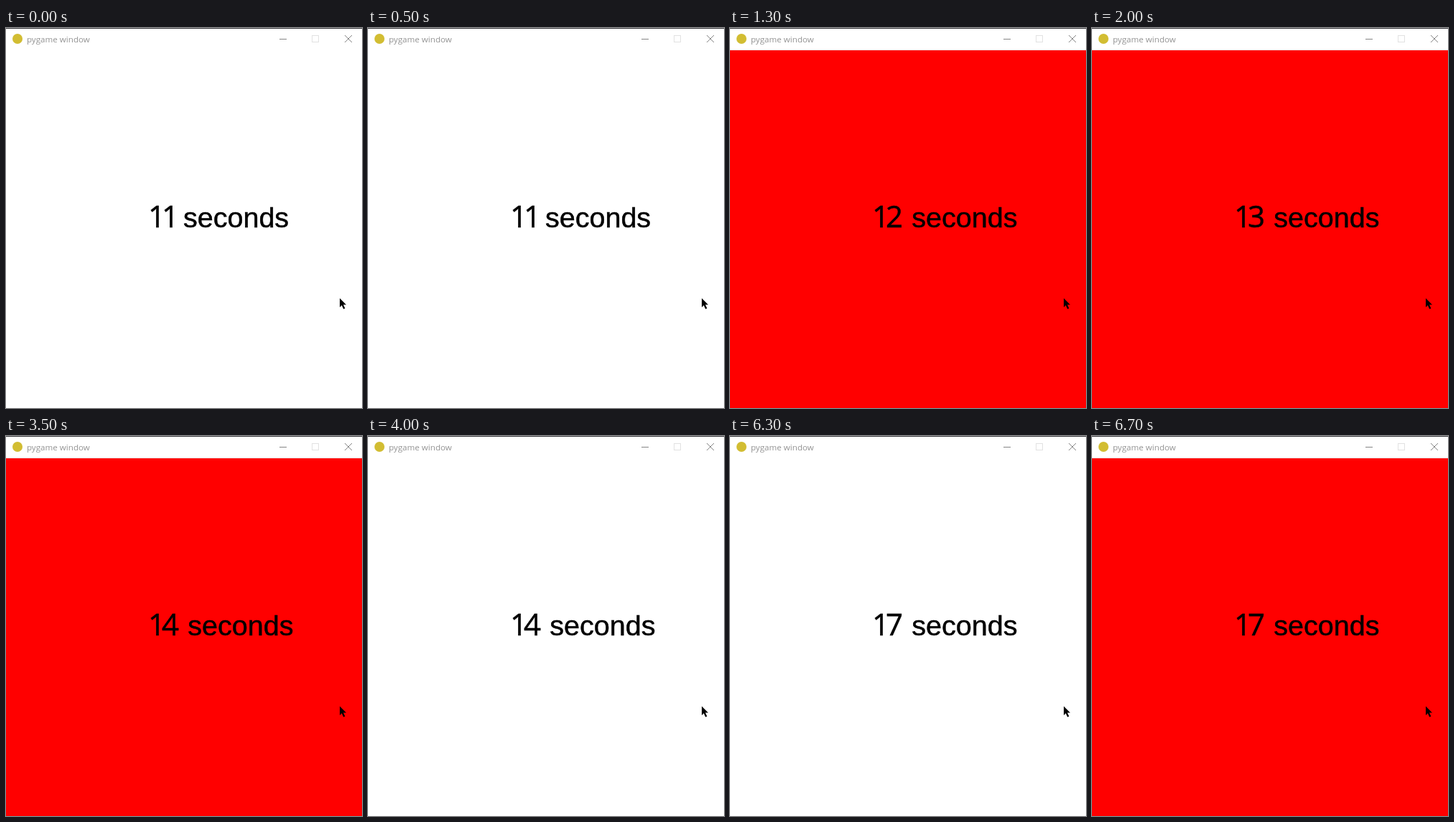
Animation, 496 px wide and 528 px high, one loop 7.2 s. Source, as an HTML page:

```html
<!DOCTYPE html>
<html lang="en">
<head>
<meta charset="utf-8">
<title>pygame window</title>
<style>
  html, body { margin: 0; width: 100%; height: 100%; overflow: hidden; background: #fff; }
  svg { display: block; width: 496px; height: 528px; }
  .title { font: 11.6px "Open Sans", "Noto Sans", sans-serif; fill: #939393; }
  .timer { font: 39.5px "Liberation Sans", Arial, sans-serif; stroke: #000; stroke-width: .5; }
  .digit { font: 42px "Open Sans", "Noto Sans", sans-serif; }
  .buttons { fill: none; stroke: #858585; }
</style>
</head>
<body>
<svg viewBox="0 0 496 528">
  <rect id="client" y="31" width="496" height="497"/>
  <rect width="496" height="31" fill="#fff"/>
  <rect width="496" height="1" fill="#353539"/>
  <rect id="edge" y="30" width="496" height="1" fill="#eee"/>

  <circle cx="16" cy="15" r="7" fill="#d2bd32"/>
  <text class="title" x="29" y="20">pygame window</text>
  <g class="buttons">
    <path d="M381 15.5h10"/>
    <rect x="426.5" y="10.5" width="9" height="9" stroke="#e2e2e2"/>
    <path d="M472 10l10 10m0-10l-10 10"/>
  </g>

  <text class="timer" y="277"><tspan class="digit" x="198">1</tspan><tspan class="digit" id="units"></tspan><tspan id="word">seconds</tspan></text>
  <path d="M465 375.5v12.5l2.8-2.8 2.4 5.2 2.2-1-2.4-5h4z"/>
</svg>
<script>
  const LOOP = 7200;
  // Times at which the counter moves on from 11.
  const TICKS = [1000, 2000, 3000, 4100, 5200, 6300];
  const byId = id => document.getElementById(id);
  const [client, edge, units, word] = ["client", "edge", "units", "word"].map(byId);

  function draw(now) {
    const t = now % LOOP;
    const red = (t >= 1300 && t < 4000) || t >= 6700;
    const digit = 1 + TICKS.filter(tick => t >= tick).length;

    client.setAttribute("fill", red ? "#f00" : "#fff");
    edge.setAttribute("visibility", red ? "visible" : "hidden");
    units.textContent = digit;
    // A "1" is narrower than the other digits, so the word sits closer to it.
    units.setAttribute("x", 217);
    word.setAttribute("x", digit === 1 ? 247 : 253.3);
  }

  const start = performance.now();
  function frame() {
    draw(performance.now() - start);
    requestAnimationFrame(frame);
  }
  frame();
</script>
</body>
</html>
```
